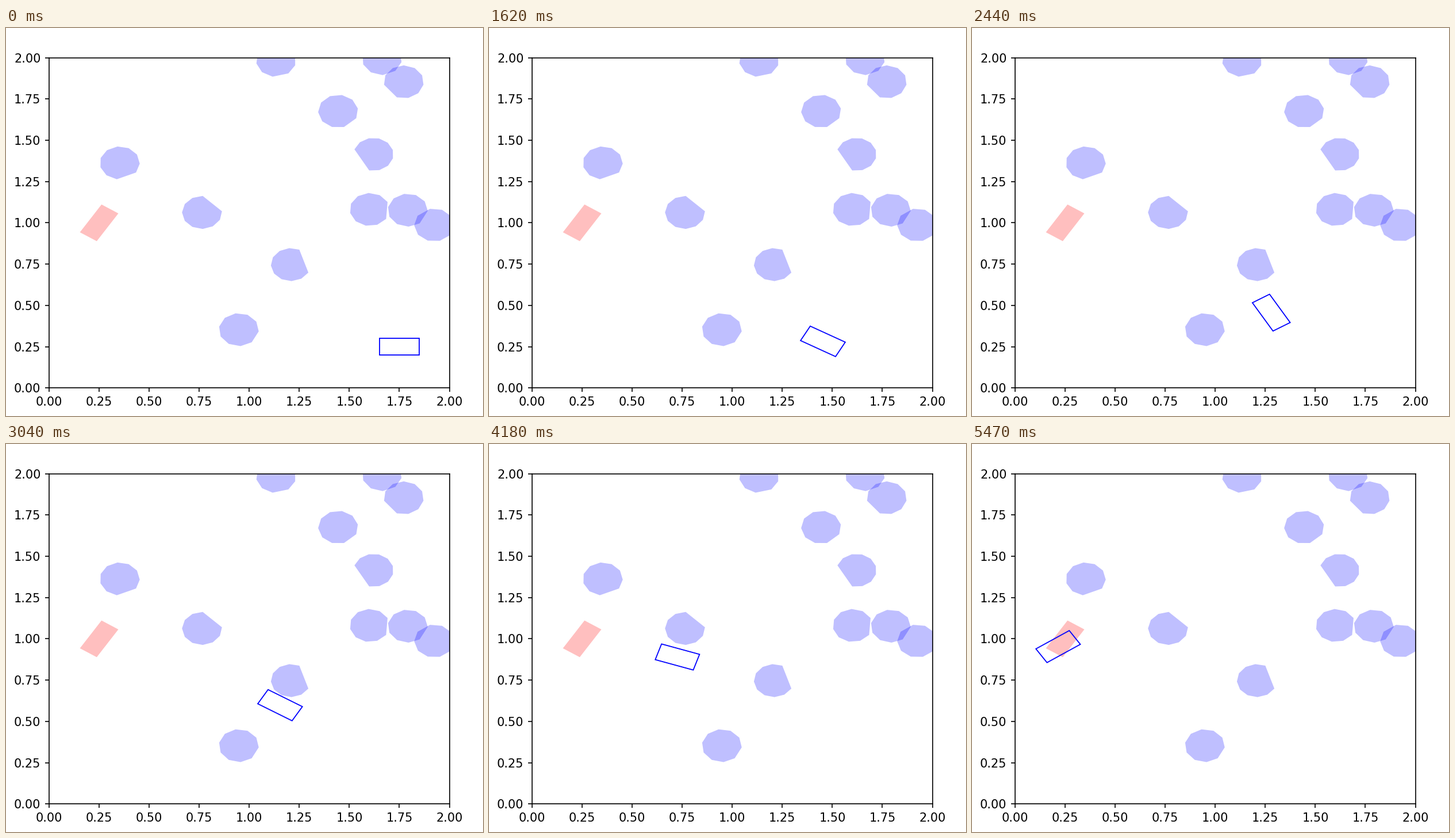
A matplotlib script that plays this animation: 830x674 px, repeating every 6590 ms.

```python
import numpy as np
import matplotlib.pyplot as plt
from matplotlib.animation import FuncAnimation
from matplotlib.lines import Line2D
from matplotlib.patches import Polygon

WIDTH, HEIGHT, DPI = 830, 674, 100
LEFT, RIGHT, TOP, BOTTOM = 75, 771.5, 51.7, 625.2
LOOP_MS, FRAMES = 6590, 330
INTERVAL = LOOP_MS / FRAMES
START_MS, STEP_MS, LAST_STEP = 985, 67.88, 67
SCALE = 1.5

# Obstacles: x, y, direction of the flat side and the arc it cuts, in degrees
OBSTACLES = [
    (0.353, 1.363, 293, 63), (0.764, 1.063, 46, 84), (0.948, 0.353, 332, 44),
    (1.208, 0.747, 18, 94), (1.134, 1.984, 284, 48), (1.663, 1.995, 292, 40),
    (1.772, 1.854, 220, 60), (1.444, 1.676, 311, 48), (1.621, 1.415, 210, 95),
    (1.602, 1.081, 356, 62), (1.792, 1.077, 332, 51), (1.924, 0.987, 124, 44),
]

# Robot key poses: step, x, y, heading in degrees
KEY_POSES = np.array([
    (0, 1.750, 0.250, 0),
    (10, 1.453, 0.282, -29),
    (22, 1.280, 0.456, -59),
    (31, 1.154, 0.598, -31),
    (39, 0.952, 0.767, -38),
    (48, 0.726, 0.890, -18.3),
    (57, 0.476, 0.970, -16.7),
    (LAST_STEP, 0.215, 0.953, 33.6),
])
STEPS, POSES = KEY_POSES[:, 0], KEY_POSES[:, 1:]
SLOPES = np.gradient(POSES, STEPS, axis=0)


def box(x, y, degrees, length=0.2, width=0.1):
    """Corners of a rotated rectangle centred on (x, y)."""
    a = np.radians(degrees)
    along = np.array([np.cos(a), np.sin(a)]) * length / 2
    across = np.array([-np.sin(a), np.cos(a)]) * width / 2
    return np.array([x, y]) + [along + across, across - along,
                               -along - across, along - across]


def blob(x, y, flat, cut, radius=0.1, corners=10):
    """Near-round polygon with one longer, flat side."""
    a = np.radians(np.linspace(flat + cut / 2, flat - cut / 2 + 360, corners))
    return np.column_stack([x + radius * np.cos(a), y + radius * np.sin(a)])


def pose_at(step):
    """Cubic Hermite interpolation through the key poses."""
    i = min(np.searchsorted(STEPS, step, side="right") - 1, len(STEPS) - 2)
    span = STEPS[i + 1] - STEPS[i]
    u = (step - STEPS[i]) / span
    return ((1 + 2 * u) * (1 - u) ** 2 * POSES[i]
            + u * (1 - u) ** 2 * span * SLOPES[i]
            + u * u * (3 - 2 * u) * POSES[i + 1]
            + u * u * (u - 1) * span * SLOPES[i + 1])


plt.rcParams.update({
    "font.family": "DejaVu Sans",
    "font.size": 10 * SCALE,
    "axes.linewidth": 0.8 * SCALE,
})
for axis in ("xtick", "ytick"):
    plt.rcParams.update({
        f"{axis}.major.size": 3.5 * SCALE,
        f"{axis}.major.width": 0.8 * SCALE,
        f"{axis}.major.pad": 3.5 * SCALE,
    })

fig = plt.figure(figsize=(WIDTH / DPI, HEIGHT / DPI), dpi=DPI, facecolor="white")
ax = fig.add_axes([LEFT / WIDTH, 1 - BOTTOM / HEIGHT,
                   (RIGHT - LEFT) / WIDTH, (BOTTOM - TOP) / HEIGHT])
ax.set(xlim=(0, 2), ylim=(0, 2))
ticks = np.linspace(0, 2, 9)
labels = [f"{t:.2f}" for t in ticks]
ax.set_xticks(ticks, labels)
ax.set_yticks(ticks, labels)

# Thin window edge on the right and bottom
right, bottom = 1 - 0.5 / WIDTH, 0.5 / HEIGHT
fig.add_artist(Line2D([right, right, 0], [1, bottom, bottom],
                      color="#c8c8c8", lw=0.72))

for obstacle in OBSTACLES:
    ax.add_patch(Polygon(blob(*obstacle), fc="blue", ec="none", alpha=0.25))
ax.add_patch(Polygon(box(0.25, 1, np.degrees(1)), fc="red", ec="none", alpha=0.25))
robot = ax.add_patch(Polygon(box(*POSES[0]), fill=False, ec="blue", lw=1.3,
                             joinstyle="miter"))


def update(frame):
    now = (frame + 1) * INTERVAL
    step = np.clip((now - START_MS) // STEP_MS + 1, 0, LAST_STEP)
    robot.set_xy(box(*pose_at(step)))
    return (robot,)


anim = FuncAnimation(fig, update, frames=FRAMES, interval=INTERVAL,
                     repeat=True, repeat_delay=0, blit=False)
plt.show()
```
